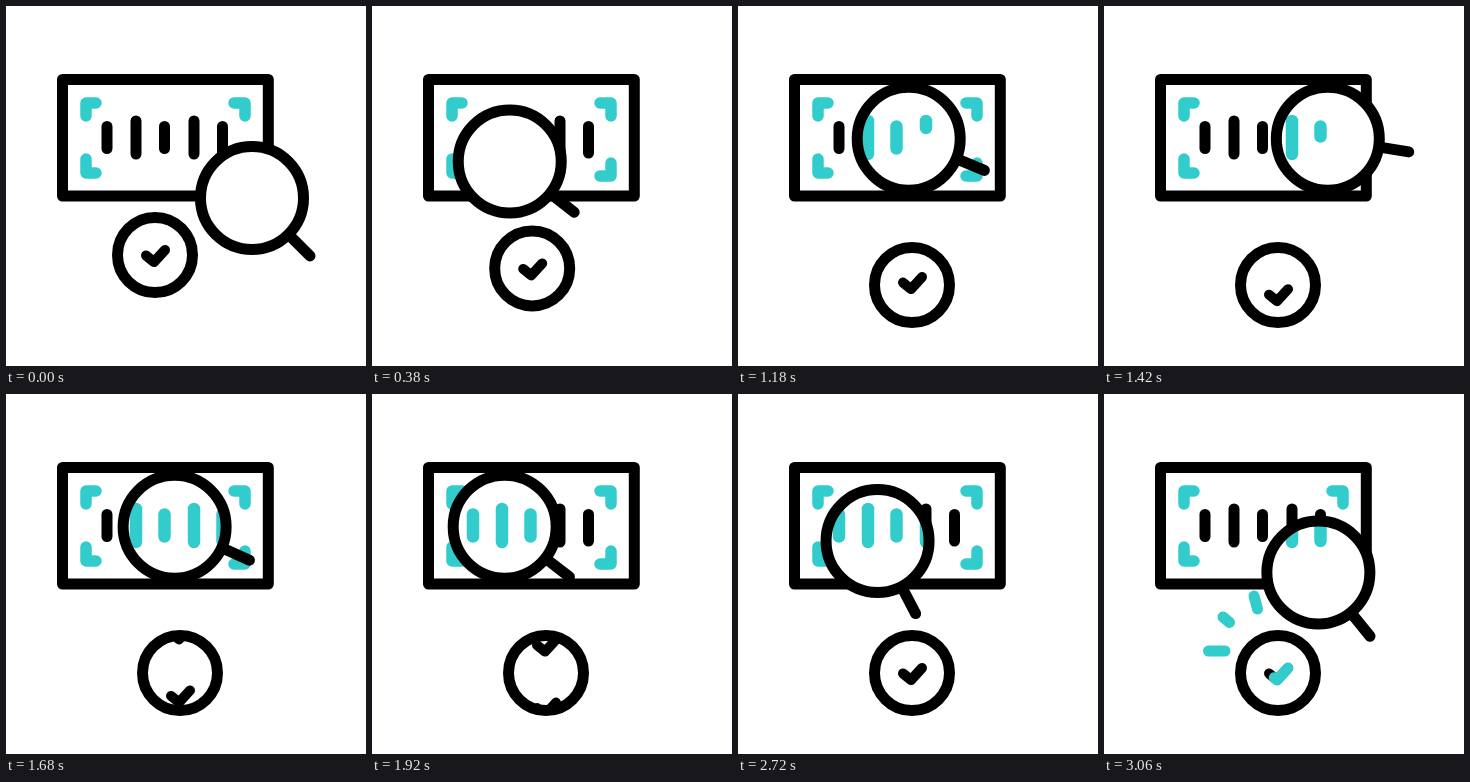
An HTML page with a canvas that plays this animation: 360 by 360 pixels, repeating every 3.08 s.

```html
<!DOCTYPE html>
<html lang="en">
<head>
<meta charset="utf-8">
<title>Scan and verify</title>
<style>
html, body { margin: 0; width: 100%; height: 100%; overflow: hidden; background: #fff; }
canvas { display: block; width: 360px; height: 360px; }
</style>
</head>
<body>
<canvas id="stage"></canvas>
<script>
const LOOP = 3080, SIZE = 360;
const INK = '#000', TEAL = '#33cccc';
const canvas = document.getElementById('stage');
const ctx = canvas.getContext('2d');
const ratio = window.devicePixelRatio || 1;
canvas.width = canvas.height = SIZE * ratio;

const linear = u => u;
const smooth = u => (1 - Math.cos(Math.PI * u)) / 2;
const gather = u => Math.pow(u, 1.45);
const gatherSlow = u => Math.pow(u, 2.6);
const settle = u => 1 - (1 - u) * (1 - u);

// Each key: [time, value, easing towards this key]
const glassX = [[90, 246], [595, 71, smooth], [1400, 229, gather], [2400, 104, settle], [3362, 246, smooth]];
const glassY = [[90, 192], [595, 133, smooth], [2408, 132.5, linear], [3362, 192, smooth]];
const glassTurn = [[90, 45], [595, 34, smooth], [1400, 8, gatherSlow], [2430, 67, linear], [3362, 46, smooth]];
const badgeMove = [[80, 0], [725, 1, smooth]];
const tickDrop = [[725, 0], [1180, -3, smooth], [2480, 63, linear]];
const tickTint = [[2860, 0], [3130, 1, linear]];
const rayGrow = [[2860, 0], [3060, 1, settle]];

const bars = [[101, 120.5, 142.5], [130, 115, 148], [158.5, 120.5, 142.5], [188, 115, 148], [216.5, 120.5, 147]];
const brackets = [
  [[80, 110], [80, 97], [90, 97]],
  [[228, 97], [239, 97], [239, 110]],
  [[80, 153], [80, 167], [90, 167]],
  [[239, 157], [239, 170], [228, 170]]
];
const rays = [
  [[153.5, 215], [150, 202]],
  [[125.5, 228.5], [119, 223]],
  [[121, 257], [104.5, 257]]
];
const tick = [[10, -5], [-1, 7], [-9, 0.5]];

function at(keys, t) {
  if (t <= keys[0][0]) return keys[0][1];
  for (let i = 1; i < keys.length; i++) {
    const [t0, v0] = keys[i - 1], [t1, v1, ease] = keys[i];
    if (t < t1) return v0 + (v1 - v0) * ease((t - t0) / (t1 - t0));
  }
  return keys[keys.length - 1][1];
}

// Strokes the first part of a polyline.
function line(points, color, width, part = 1) {
  if (part <= 0) return;
  const lengths = points.slice(1).map((p, i) => Math.hypot(p[0] - points[i][0], p[1] - points[i][1]));
  let left = part * lengths.reduce((a, b) => a + b, 0);
  ctx.beginPath();
  ctx.moveTo(...points[0]);
  for (let i = 0; i < lengths.length && left > 0; i++) {
    const [ax, ay] = points[i], [bx, by] = points[i + 1];
    const u = Math.min(1, left / lengths[i]);
    ctx.lineTo(ax + (bx - ax) * u, ay + (by - ay) * u);
    left -= lengths[i];
  }
  ctx.strokeStyle = color;
  ctx.lineWidth = width;
  ctx.stroke();
}

function disc(x, y, r) {
  ctx.beginPath();
  ctx.arc(x, y, r, 0, Math.PI * 2);
}

function lens(x, y, r, content) {
  disc(x, y, r);
  ctx.fillStyle = '#fff';
  ctx.fill();
  ctx.save();
  ctx.clip();
  content();
  ctx.restore();
  disc(x, y, r);
  ctx.strokeStyle = INK;
  ctx.lineWidth = 11;
  ctx.stroke();
}

function drawCard() {
  ctx.strokeStyle = INK;
  ctx.lineWidth = 11;
  ctx.strokeRect(56.5, 73.5, 205.8, 116.5);
  brackets.forEach(b => line(b, TEAL, 11.5));
  bars.forEach(([x, top, end]) => line([[x, top], [x, end]], INK, 11));
}

function drawGlass(t) {
  const x = at(glassX, t), y = at(glassY, t);
  const a = at(glassTurn, t) * Math.PI / 180;
  const spoke = r => [x + r * Math.cos(a), y + r * Math.sin(a)];
  line([spoke(54), spoke(82)], INK, 11);
  lens(x, y, 51.5, () => {
    bars.forEach(([bx, top, end], i) => {
      const grown = Math.min(1, (t - 530 - 200 * i) / 240);
      line([[bx, top], [bx, end]], TEAL, 12.5, grown);
    });
  });
}

function drawBadge(t) {
  const m = at(badgeMove, t);
  const x = 149 + 25 * m, y = 249 + 30 * m;
  const drop = at(tickDrop, t);
  const placed = dy => tick.map(([px, py]) => [x + px, y + py + dy]);
  lens(x, y, 37.5, () => {
    line(placed(drop), INK, 10);
    line(placed(drop - 63), INK, 10);
    line(placed(drop - 63), TEAL, 11, at(tickTint, t));
  });
  const grown = at(rayGrow, t);
  rays.forEach(r => line(r, TEAL, 11, grown));
}

function draw(t) {
  ctx.setTransform(ratio, 0, 0, ratio, 0, 0);
  ctx.fillStyle = '#fff';
  ctx.fillRect(0, 0, SIZE, SIZE);
  ctx.lineCap = ctx.lineJoin = 'round';
  drawCard();
  drawGlass(t);
  drawBadge(t);
}

const start = performance.now();
function tickFrame() {
  draw((performance.now() - start) % LOOP);
  requestAnimationFrame(tickFrame);
}
tickFrame();
</script>
</body>
</html>
```
